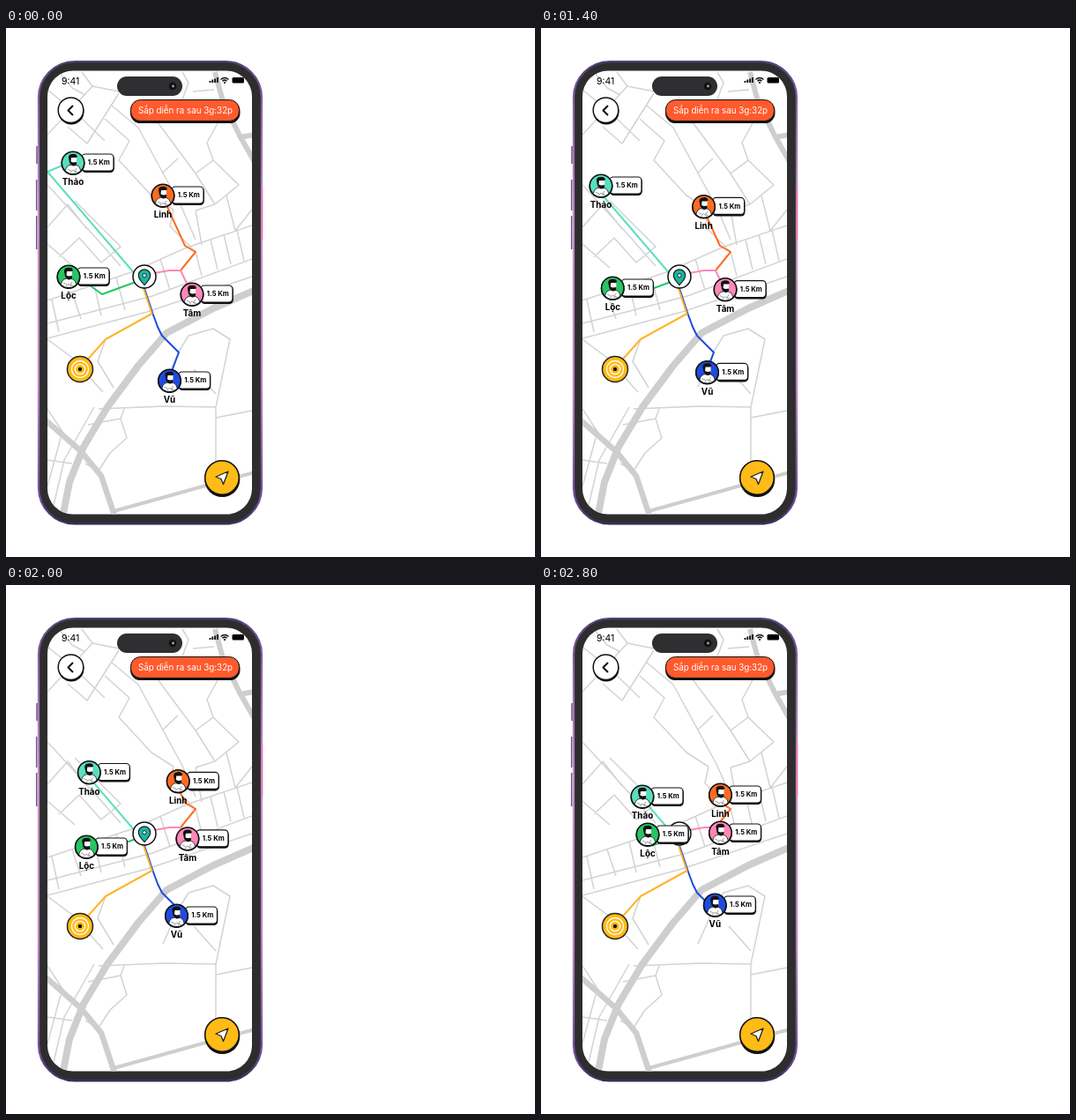
Write an HTML page that moves like this. It is 600x600 px and loops after 3 s.

```html
<!DOCTYPE html>
<html lang="vi">
<head>
<meta charset="utf-8">
<style>
  html, body { margin: 0; width: 100%; height: 100%; overflow: hidden; background: #fff; }
  svg { display: block; width: 100vw; height: 100vh; }
  text { font-family: Inter, "Open Sans", sans-serif; }
  .mid { text-anchor: middle; font-weight: 700; }
  .line { fill: none; stroke-linejoin: round; }
  .road { stroke: #d3d3d3; }
  .ink { stroke: #111; stroke-width: 1.5; }
</style>
</head>
<body>
<svg viewBox="0 0 600 600">
  <defs>
    <linearGradient id="rim" x2="0" y2="1">
      <stop offset="0" stop-color="#55407a"/><stop offset=".1" stop-color="#8a63a8"/>
      <stop offset=".35" stop-color="#c98fc4"/><stop offset=".7" stop-color="#b884bd"/>
      <stop offset=".95" stop-color="#6d4b9c"/><stop offset="1" stop-color="#3d2c60"/>
    </linearGradient>
    <clipPath id="screen"><rect x="47" y="48.500" width="232" height="503" rx="29"/></clipPath>
    <clipPath id="round"><circle r="12"/></clipPath>
    <g id="bust" clip-path="url(#round)">
      <path d="M-9 13Q-9 4-4 2.500L4 2.500Q9 4 9 13Z" fill="#fff" stroke="#111" stroke-width=".8"/>
      <path d="M-3.500-7H4V1L1 4.500L-3 2Z" fill="#fff"/>
      <path d="M-4.500-3Q-6.500-9-2-10Q4-11.500 5-7L3.500-6L-2-6L-2.500-1.500L0-.5L4-1L4 1.500Q2 4.500-1 3Q-4 2-4.500-3Z" fill="#111"/>
      <path d="M-6 7l4 2M-3 11l3-3l3 3M4 6l-2 3l4 2M-8 11l3 0" fill="none" stroke="#555" stroke-width=".6"/>
    </g>
  </defs>

  <path d="M35 134V154M34.700 172V207M34.700 213V251" stroke="#6d5290" stroke-width="1.500"/>
  <rect x="37" y="38" width="253" height="524.500" rx="41" fill="#2f2f31" stroke="url(#rim)" stroke-width="2.200"/>
  <path d="M290.500 180V240" stroke="#ee6fae" stroke-width="1.500"/>
  <rect x="40" y="41" width="246.500" height="518.500" rx="37" fill="#2d2d2e"/>
  <rect x="47" y="48.500" width="232" height="503" rx="29" fill="#fff"/>

  <g clip-path="url(#screen)">
    <g class="line road" stroke-width="1.5">
      <path d="M86 50L98 66L128 72M98 66L47 121M47 70L78 95L112 128M60 50L75 68L90 76M128 74L92 131L70 112"/>
      <path d="M112 103L140 128L128 150L165 190L190 206M120 88L150 113L200 205L215 240M172 107L215 165L237 200M195 148L178 164M215 165L235 150L264 178L237 200L215 207"/>
      <path d="M200 50L207 62L200 81M212 72L236 70M240 108L228 130L235 150"/>
      <path d="M47 178L102 238L130 270M47 226L70 200L92 228M60 260L83 238L108 266L130 248L78 196M47 245L78 272"/>
      <path d="M47 309L145 276L205 249L279 224M60 345L52 308M47 335L166 304L279 262M75 300L85 330M100 291L108 326M125 283L135 320M47 352L160 322L279 282"/>
      <path d="M190 206L186 225L215 254L222 281M232 240L240 274M247 234L255 268M262 229L270 264M215 207L222 246M250 190L260 230L279 206M175 262L186 297"/>
      <path d="M47 353L75 374L110 413M113 353L104 378L122 408M196 367L207 349L235 341L254 353L238 430L238 520M196 367L178 407M213 387L238 415"/>
      <path d="M105 432L180 429L238 430M238 442L279 434M93 450L130 443L134 432M130 443L137 465L118 482L105 502L90 494M62 465L47 520M100 430L66 490L52 550M47 490L75 494M47 432L68 464"/>
    </g>
    <g class="line" stroke="#cecece">
      <path d="M283 297L235 318L182 346L150 383L115 430L88 475L72 515L64 556" stroke-width="8"/>
      <path d="M45 445L85 480L108 508L124 556" stroke-width="6.500"/>
      <path d="M237 50L246 83L265 122L282 152M265 124L282 121" stroke-width="6"/>
      <path d="M122 548L180 532L230 518L282 504" stroke-width="4"/>
    </g>
    <g id="routes" class="line" stroke-width="2"></g>
    <path class="line" d="M155.500 294L165.500 324L113 353L88 381" stroke="#ffb52b" stroke-width="2"/>
  </g>

  <text x="63" y="64" font-size="10.500">9:41</text>
  <rect x="126" y="55" width="74" height="22" rx="11" fill="#2f2f31"/>
  <circle cx="189" cy="66" r="4.300" fill="#111"/><circle cx="189.500" cy="66" r="1.400" fill="#aaa"/>
  <path d="M231.500 62V60M234.300 62V58.500M237.100 62V57.500M239.900 62V56" stroke="#111" stroke-width="1.900"/>
  <path class="line" d="M243.500 58.500Q248 54.500 252.500 58.500M245.500 60.300Q248 58 250.500 60.300" stroke="#111" stroke-width="1.500"/>
  <circle cx="248" cy="62" r="1.100"/>
  <rect x="256.500" y="56" width="13.500" height="6.500" rx="1.500"/>

  <circle cx="74" cy="95" r="14.500" fill="#111"/>
  <circle class="ink" cx="73.500" cy="93.200" r="14.300" fill="#fff"/>
  <path class="line" d="M76 88L70.500 93.500L76 99" stroke="#111" stroke-width="2"/>
  <rect x="141" y="83" width="124.500" height="25" rx="11.500" fill="#111"/>
  <rect x="141.500" y="81.500" width="123" height="24" rx="11" fill="#ff5a2d" stroke="#111"/>
  <text x="203.500" y="97.300" font-size="9.800" fill="#fff" text-anchor="middle">Sắp diễn ra sau 3g:32p</text>

  <circle cx="245.300" cy="512" r="20" fill="#111"/>
  <circle class="ink" cx="245" cy="510" r="19.300" fill="#ffbb16"/>
  <path d="M252 503L238 509L244 511.500L246.500 517.500Z" fill="#fff" stroke="#222" stroke-width="1.300" stroke-linejoin="round"/>

  <g transform="translate(84 387)" fill="none" stroke="#fff" stroke-width="1.300">
    <circle class="ink" r="14.500" style="fill:#ffbb16;stroke:#222"/>
    <circle r="9.500"/><circle r="5.700"/><circle r="2.200" fill="#111" stroke="none"/>
  </g>
  <g transform="translate(157 282)">
    <circle class="ink" r="13" fill="#fff"/>
    <path d="M0 9.500C-3 6-6.700 3-6.700-1.500A6.700 6.700 0 0 1 6.700-1.500C6.700 3 3 6 0 9.500Z" fill="#16b8a3" stroke="#222" stroke-width="1.200"/>
    <circle cy="-1.200" r="2.100" fill="#fff" stroke="#222"/>
  </g>
  <g id="people"></g>
</svg>
<script>
const LOOP = 3000, START = 800, STEP = 100, LAST = 21;

// keys: [step, x, y]; routes run from the meeting point outwards
const people = [
  { name: "Thảo", color: "#58dfbd", route: "M148 281L47 163L66 155L76 153",
    keys: [[0, 76, 153], [1, 75, 154], [4, 67, 163.5], [6, 66, 174], [7, 68, 179], [11, 85, 201], [13, 94.3, 212.5], [17, 110, 234], [21, 115, 240]] },
  { name: "Linh", color: "#ff6c20", route: "M198 275L215 254L203 247L178 192",
    keys: [[0, 178, 190], [21, 203.5, 238]] },
  { name: "Lộc", color: "#27c564", route: "M150 287L109 302L84 284L71 282",
    keys: [[0, 71, 282], [7, 81.3, 295], [10.5, 86, 300], [13, 91.3, 297], [17, 111, 288], [21, 121, 283]] },
  { name: "Tâm", color: "#ff87b9", route: "M168 278L185 275L198 275L211 302",
    keys: [[0, 211, 302], [21, 203.5, 281]] },
  { name: "Vũ", color: "#1f4be0", route: "M156.5 294L166.5 324L172 339L177 349L185 357L196 368L187 392",
    keys: [[0, 185.5, 400], [21, 197.3, 363]] }
];

const card = p => `
  <rect x="10" y="-9" width="36.800" height="20" rx="4.500" fill="#111"/>
  <rect x="10" y="-10" width="36" height="19" rx="4" fill="#fff" stroke="#111" stroke-width="1.200"/>
  <text class="mid" x="29.300" y="2.300" font-size="7.700">1.5 Km</text>
  <circle cy=".5" r="13.500" fill="#111"/>
  <circle class="ink" r="12.700" fill="${p.color}"/>
  <use href="#bust"/>
  <text class="mid" y="25.300" font-size="9.800">${p.name}</text>`;

function add(parent, tag, attrs, html = "") {
  const node = document.createElementNS("http://www.w3.org/2000/svg", tag);
  for (const key in attrs) node.setAttribute(key, attrs[key]);
  node.innerHTML = html;
  return document.getElementById(parent).appendChild(node);
}

for (const p of people) {
  p.line = add("routes", "path", { d: p.route, stroke: p.color });
  p.node = add("people", "g", {}, card(p));
  p.samples = Array.from({ length: Math.ceil(p.line.getTotalLength()) + 1 },
    (_, i) => p.line.getPointAtLength(i));
}

// Cubic Hermite between keys, at rest at both ends
function valueAt(keys, s, axis) {
  const i = Math.max(0, keys.findIndex(k => k[0] >= s) - 1);
  const slope = n => n === 0 || n === keys.length - 1 ? 0 :
    (keys[n + 1][axis] - keys[n - 1][axis]) / (keys[n + 1][0] - keys[n - 1][0]);
  const [a, b] = [keys[i], keys[i + 1]], span = b[0] - a[0], u = (s - a[0]) / span, v = 1 - u;
  return a[axis] * (1 + 2 * u) * v * v + b[axis] * u * u * (3 - 2 * u)
    + span * u * v * (slope(i) * v - slope(i + 1) * u);
}

function nearest(samples, x, y) {
  let best = 0, min = Infinity;
  samples.forEach((q, i) => {
    const d = Math.hypot(q.x - x, q.y - y);
    if (d < min) { min = d; best = i; }
  });
  return best;
}

function draw(time) {
  const s = Math.max(0, Math.min(LAST, Math.floor((time % LOOP - START) / STEP) + 1));
  for (const p of people) {
    const x = valueAt(p.keys, s, 1), y = valueAt(p.keys, s, 2);
    p.node.setAttribute("transform", `translate(${x} ${y})`);
    p.line.setAttribute("stroke-dasharray", `${nearest(p.samples, x, y)} 999`);
  }
}

function tick() {
  draw(performance.now());
  requestAnimationFrame(tick);
}
tick();
</script>
</body>
</html>
```
